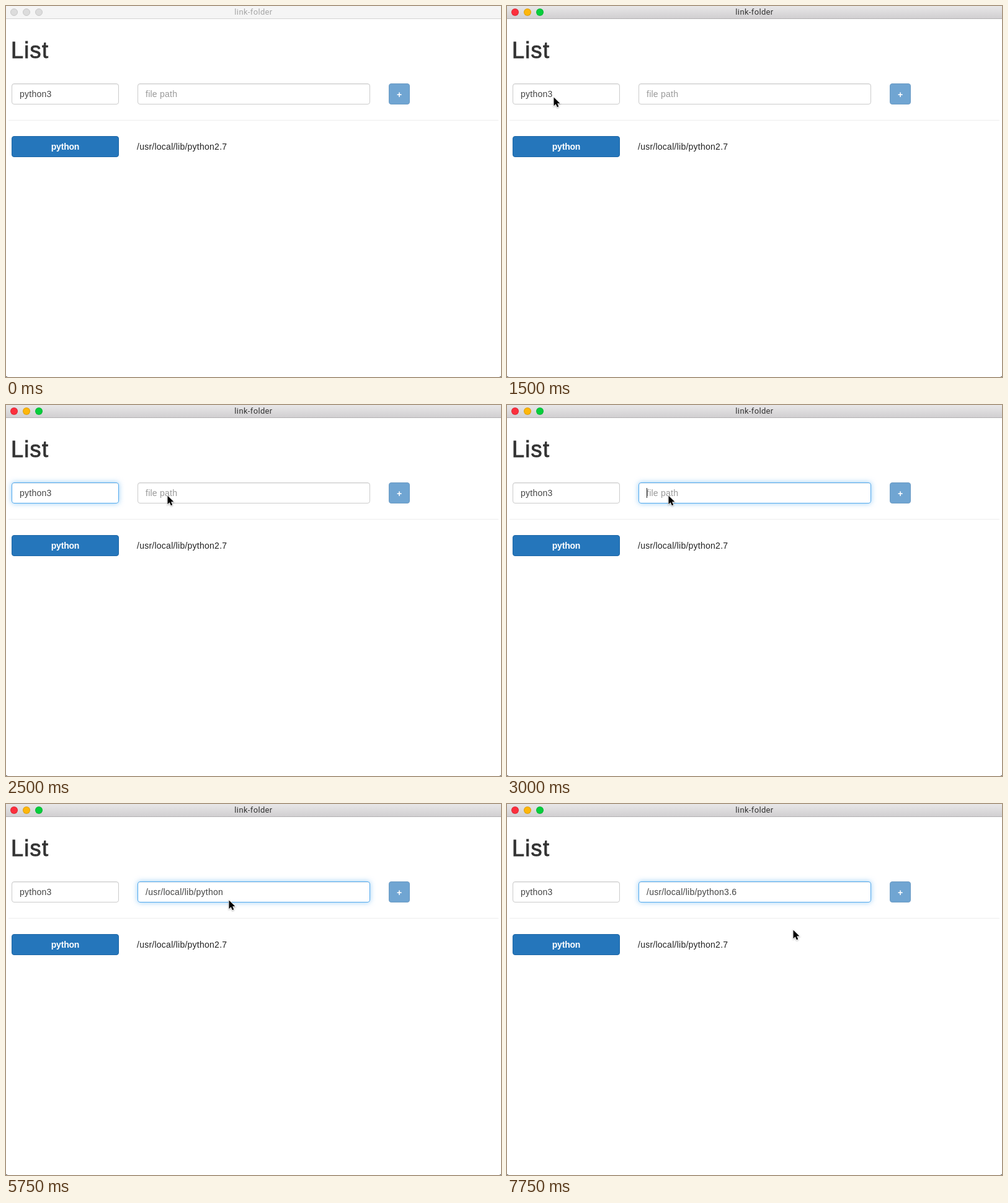
These frames come from a looping animation (798 by 599 pixels, 8 s). An HTML page:

```html
<!DOCTYPE html>
<html lang="en">
<head>
<meta charset="utf-8">
<title>link-folder</title>
<style>
html, body { margin: 0; width: 100%; height: 100%; overflow: hidden; background: #fff; }
body { position: relative; font: 14px/34px "Liberation Sans", Arial, sans-serif; letter-spacing: .25px; color: #222; }
body * { position: absolute; box-sizing: border-box; white-space: pre; }
#bar { left: 0; top: 0; width: 798px; height: 21px; background: #f5f5f5; border-bottom: 1px solid #d4d4d4;
  font: 13px/20px Roboto, sans-serif; letter-spacing: .35px; text-align: center; color: #a6a6a6; }
#bar i { top: 4px; width: 12px; height: 12px; border-radius: 50%; background: #dcdcdc; border: 1px solid #c9c9c9; }
#bar.active { background: linear-gradient(#e8e7e8, #d1cfd1); border-color: #b3b1b3; color: #333; }
#bar.active i { background: var(--on); border-color: rgba(0, 0, 0, .12); }
h1 { left: 8px; top: 52px; margin: 0; font-size: 36px; font-weight: 400; line-height: 40px;
  letter-spacing: 1.3px; color: #333; -webkit-text-stroke: .9px #333; }
.field { top: 125px; height: 34px; padding-left: 12px; line-height: 32px; border: 1px solid #ccc; border-radius: 4px;
  color: #444; box-shadow: inset 0 1px 1px rgba(0, 0, 0, .075); }
.field.focus { border-color: #52aaee; box-shadow: inset 0 1px 1px rgba(0, 0, 0, .075), 0 0 8px rgba(82, 170, 238, .6); }
.field span { position: static; }
.field .hint { color: #999; }
.field b { position: relative; display: inline-block; width: 1px; height: 16px; margin-right: -1px; vertical-align: -3px; background: #222; }
.button { height: 34px; border: 1px solid #1d66a6; border-radius: 4px; background: #2576bb; color: #fff;
  font-weight: bold; line-height: 32px; letter-spacing: -.2px; text-align: center; }
#rule { left: 4px; top: 184px; width: 790px; height: 1px; background: #eee; }
.corner { top: 598px; width: 2px; height: 1px; background: #666; }
#cursor { left: 0; top: 0; width: 18px; height: 24px; overflow: visible; filter: drop-shadow(0 1px 1px rgba(0, 0, 0, .3)); }
</style>
</head>
<body>
<div id="bar">link-folder<i style="left:7px;--on:#fc2f3d"></i><i style="left:27px;--on:#fdb60b"></i><i style="left:47px;--on:#06ce3c"></i></div>
<h1>List</h1>
<div class="field" id="name" style="left:9px;width:173px"></div>
<div class="field" id="path" style="left:212px;width:375px"></div>
<div class="button" style="left:617px;top:125px;width:34px;opacity:.65;line-height:34px">+</div>
<div id="rule"></div>
<div class="button" style="left:9px;top:210px;width:173px">python</div>
<div style="left:211px;top:210px">/usr/local/lib/python2.7</div>
<div class="corner" style="left:0"></div>
<div class="corner" style="left:796px"></div>
<svg id="cursor"><path d="M.5 .5V14.2L3.7 11.2L5.9 16.3L8.3 15.3L6.1 10.2H10.4Z" stroke="#fff" stroke-width="1.6" paint-order="stroke"/></svg>
<script>
const LOOP = 8000, STEP = 250;
const $ = id => document.getElementById(id);
const bar = $("bar"), nameField = $("name"), pathField = $("path"), cursor = $("cursor");

// Each entry holds from its time until the next one.
const moves = [
  [0], [250, 354, 41], [500, 232, 112], [750, 125, 162], [1000, 84, 153], [1250, 75, 147],
  [2250, 196, 149], [2500, 260, 146], [4500, 359, 155], [7500, 425, 184], [7750, 461, 203]
];
const base = "/usr/local/lib/python";
const edits = [
  [0, ""], [4000, base + "2.7"], [5000, base + "2."], [5250, base],
  [6750, base + "3"], [7000, base + "3."], [7250, base + "3.6"]
];
const NAME_FOCUS = 1750, PATH_FOCUS = 2750;

const latest = (list, t) => list.findLast(entry => entry[0] <= t);
const caret = (t, since) => (t - since) % 1000 < 500 ? "<b></b>" : "";

function setField(el, focused, html) {
  el.classList.toggle("focus", focused);
  if (el.shown !== html) el.innerHTML = el.shown = html;
}

function draw(now) {
  const t = Math.floor(now % LOOP / STEP) * STEP;
  const inPath = t >= PATH_FOCUS, inName = t >= NAME_FOCUS && !inPath;
  bar.classList.toggle("active", t >= 1500);

  setField(nameField, inName, "<span>python3</span>" + (inName ? caret(t, NAME_FOCUS) : ""));

  const [edited, text] = latest(edits, t);
  const mark = inPath ? caret(t, Math.max(edited, PATH_FOCUS)) : "";
  setField(pathField, inPath, text ? `<span>${text}</span>${mark}` : `${mark}<span class="hint">file path</span>`);

  const [, x, y] = latest(moves, t);
  cursor.style.display = x === undefined ? "none" : "block";
  cursor.style.transform = `translate(${x}px, ${y}px)`;
  requestAnimationFrame(draw);
}
draw(0);
</script>
</body>
</html>
```
